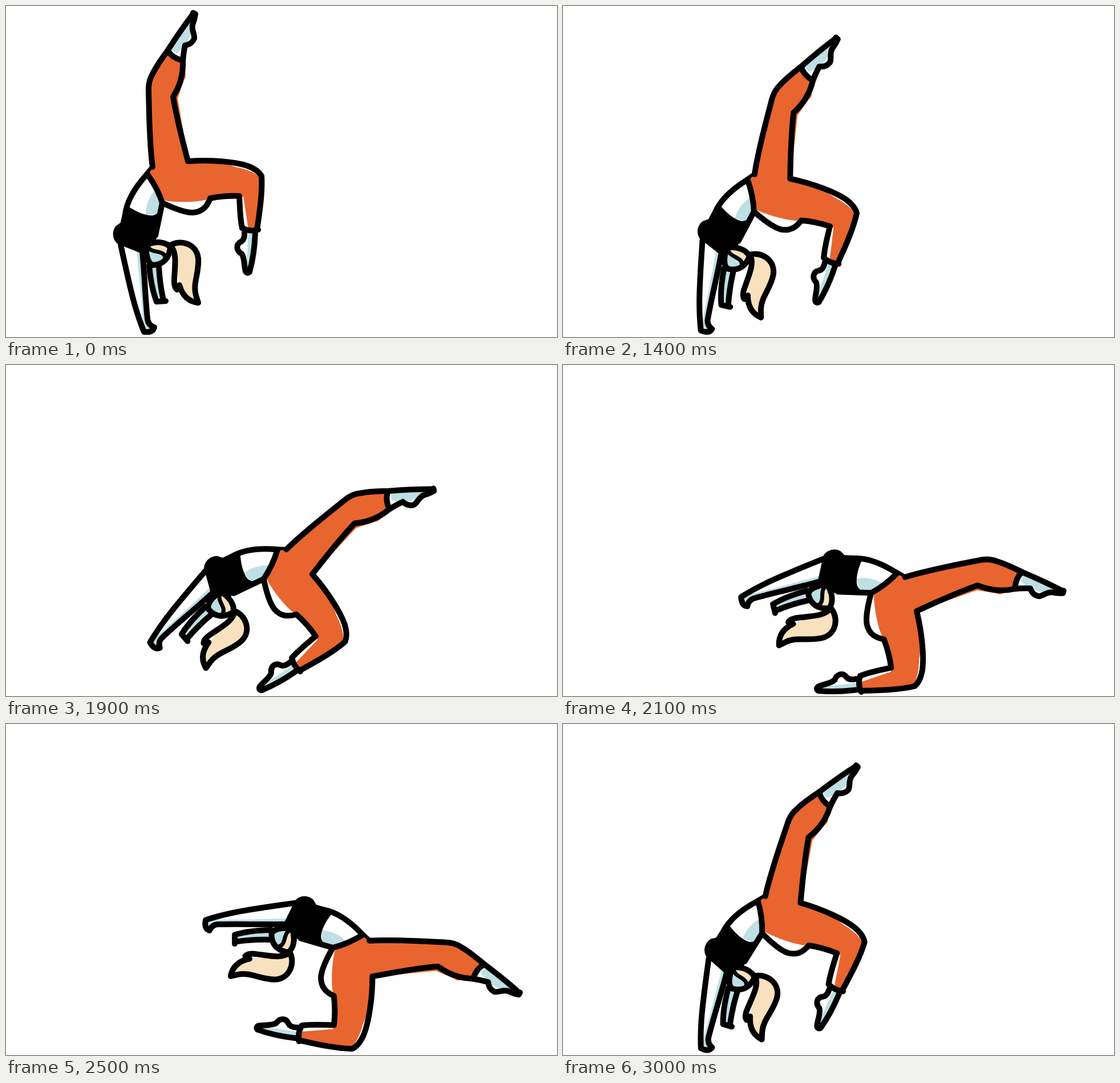
Animation of 966x580 px, one loop 3200 ms. Source, as an HTML page:

```html
<!DOCTYPE html>
<html lang="en">
<head>
<meta charset="utf-8">
<title>Rocking gymnast</title>
<style>
html, body { margin: 0; width: 100%; height: 100%; overflow: hidden; background: #fff; }
svg { display: block; width: 966px; height: 580px; }
.line { fill: none; stroke: #000; stroke-width: 10; stroke-linecap: round; stroke-linejoin: round; }
.thin { stroke-width: 7; }
.white { fill: #fff; }
.skin { fill: #bedfe3; }
.hair { fill: #f8e1be; }
.pants { fill: #e8652f; }
</style>
</head>
<body>
<svg viewBox="0 0 966 580">
<g id="body">
  <!-- far arm -->
  <path class="skin" d="M251 455L257 495L265 517L277 516L271 490L268 455Z"/>
  <path class="line" d="M251 455C253 478 257 500 264 518L280 517M268 455C269 480 272 498 276 515"/>

  <!-- ponytail -->
  <path class="hair" d="M291 420C310 410 333 417 337 441C339 468 327 490 333 507L337 519C320 514 309 502 305 487L299 466Q301 440 291 420Z"/>
  <path class="line" d="M287 420C305 408 334 416 337 442C339 468 327 486 333 507L337 520C320 518 309 507 304 489L300 497Q294 493 295 478C296 455 300 432 289 421"/>

  <!-- head -->
  <path class="skin" d="M246 419C262 411 281 413 288 423C286 442 276 453 258 454C249 452 245 437 246 419Z"/>
  <path class="hair" d="M249 417C266 411 282 414 288 423L280 441C276 426 260 435 249 417Z"/>
  <path class="line" d="M246 419C262 411 281 413 288 423C286 442 276 453 258 454C249 452 245 437 246 421"/>
  <path class="line thin" d="M248 420C253 435 276 426 279 440"/>

  <!-- near arm -->
  <path class="white" d="M201 418L225 520L243 571L258 570L262 562L249 552L239 430Z"/>
  <path class="skin" d="M229 428L240 430L244 510L250 555L260 563L256 569L243 569L240 552L236 500Z"/>
  <path class="line" d="M201 418C209 455 219 502 227 528Q234 552 242 571Q257 573 260 563Q249 559 248 548C244 510 243 470 239 430"/>

  <!-- torso -->
  <path class="white" d="M246 296C225 320 215 340 213 356L271 366L274 345Z"/>
  <path class="skin" d="M266 318C253 330 245 346 245 366L267 365L274 345Z"/>
  <path d="M213 350C228 361 246 368 257 367Q266 366 277 350L262 414L248 418L245 431L236 433L196 417C186 409 185 394 193 385L202 379Z"/>
  <path class="line" d="M257 283L246 296C229 315 212 340 209 365L205 384M274 345L262 402"/>

  <!-- legs -->
  <path class="pants" d="M284 82L306 96L312 114Q318 121 312 130L301 162L320 273C355 271 385 275 402 282Q438 289 447 303Q449 340 440 391L425 391L416 334L358 337C343 344 302 345 278 341Q265 315 250 294L258 282L250 200L251 138Q260 115 284 82Z"/>
  <path class="skin" d="M322 26L325 44Q320 66 306 77L300 83L290 77Z"/>
  <path class="skin" d="M425 397L437 397L432 432L426 466L421 464Z"/>
  <path class="line" d="M257 282C253 254 252 220 251 192L250 150Q249 132 257 119C264 104 275 90 284 77C295 60 314 32 328 14"/>
  <path class="line" d="M328 12L332 14Q331 23 327 33C325 43 331 49 330 57Q326 67 314 69Q311 82 310 98C311 122 303 143 293 159C299 197 310 238 319 272C360 269 402 273 423 280Q442 287 448 298C450 327 444 365 440 392"/>
  <path class="line" d="M284 79Q292 91 308 95M414 389Q427 396 442 392"/>
  <path class="line" d="M414 389C410 371 410 350 409 333Q382 332 358 337C352 353 343 361 327 362C312 362 293 354 274 345Q265 318 248 295"/>
  <path class="line" d="M418 396Q419 409 412 413C402 418 404 429 413 434C419 442 417 456 420 465Q423 470 427 466C432 448 436 424 437 397"/>
</g>
</svg>
<script>
const LOOP = 3200, STEP = 100, FLOOR = 569;
const LOW = 20, HIGH = 112.6;

// The body rolls over hand, foot and knee; floorX is where each one stands.
const hand = { x: 250, y: 569, floorX: 250 };
const foot = { x: 425, y: 467, floorX: 446 };
const knee = { x: 448, y: 298, floorX: 607 };

const body = document.getElementById("body");
const clamp = u => Math.min(1, Math.max(0, u));
const mix = (a, b, u) => a + (b - a) * u;
const smooth = u => u * u * (3 - 2 * u);

// Lean in degrees: rest, tip over, fall forward, rock back
function leanAt(t) {
  if (t < 1000) return 0;
  if (t < 1700) return mix(8, LOW, clamp((t - 1200) / 300));
  if (t < 2300) return mix(LOW, HIGH, ((t - 1500) / 800) ** 1.5);
  return mix(HIGH, LOW, smooth(clamp((t - 2300) / 700)));
}

// Lean at which the next corner reaches the floor
const touch = (a, b) => Math.atan2(a.y - b.y, b.x - a.x) * 180 / Math.PI;

function draw(time) {
  const lean = leanAt(Math.floor(time / STEP) * STEP);
  const pivot = lean > touch(foot, knee) ? knee
    : lean > touch(hand, foot) ? foot : hand;
  body.setAttribute("transform",
    `translate(${pivot.floorX} ${FLOOR}) rotate(${lean}) translate(${-pivot.x} ${-pivot.y})`);
}

const begin = performance.now();
function tick() {
  draw((performance.now() - begin) % LOOP);
  requestAnimationFrame(tick);
}
tick();
</script>
</body>
</html>
```
